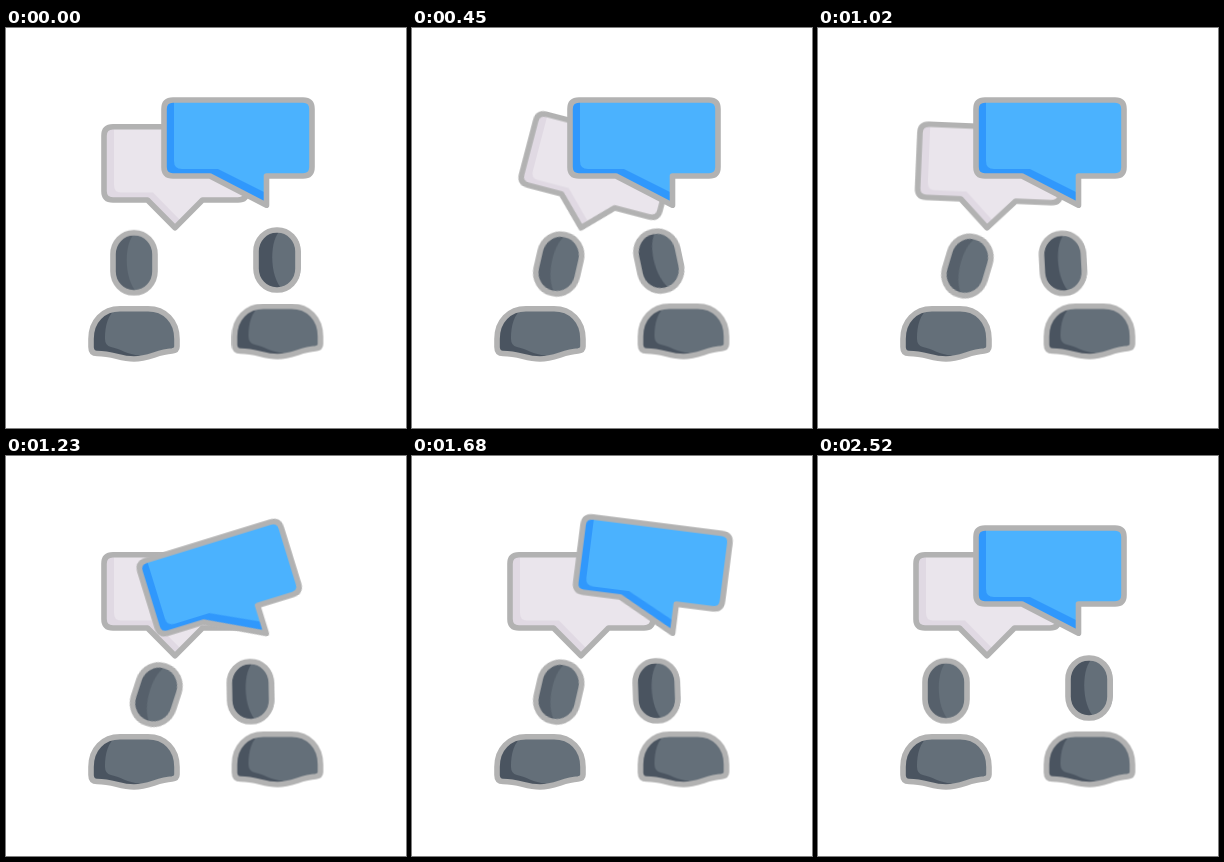
Recreate the animation shown at these times as an HTML page. Size 400 by 400 pixels, loop 2550 ms.

```html
<!DOCTYPE html>
<html lang="en">
<head>
<meta charset="utf-8">
<title>Conversation</title>
<style>
html, body { margin: 0; width: 100%; height: 100%; overflow: hidden; background: #fff; }
svg { display: block; width: 100%; height: 100%; }

.line { fill: none; stroke: #b2b2b2; stroke-width: 5.6; stroke-linejoin: round; }
.skin { fill: #646f79; }
.dark { fill: #4a5460; }
.soft { fill: #56606b; }

.move { animation: 2550ms infinite cubic-bezier(.37, 0, .63, 1); }
.bubble-l { transform-origin: 169px 200px; animation-name: bubble-l; }
.bubble-r { transform-origin: 261px 178px; animation-name: bubble-r; }
.head-l { animation-name: head-l; }
.head-r { animation-name: head-r; }
.body-l { animation-name: body-l; }
.body-r { animation-name: body-r; }

/* Each bubble swings on its tail tip and settles */
@keyframes bubble-l {
  0%, 45.88%, 100% { transform: rotate(0deg); }
  6.47% { transform: rotate(-20.5deg); }
  18.43% { transform: rotate(15deg); }
  28.63% { transform: rotate(-8.8deg); }
  37.65% { transform: rotate(3deg); }
}
@keyframes bubble-r {
  0%, 43.53%, 89.41%, 100% { transform: rotate(0deg); }
  50% { transform: rotate(-20.5deg); }
  61.96% { transform: rotate(14.5deg); }
  72.5% { transform: rotate(-9deg); }
  81.18% { transform: rotate(3deg); }
}
@keyframes head-l {
  0%, 90.6%, 100% { transform: translate(0, 0) rotate(0deg); }
  15.7%, 17.65% { transform: translate(18.7px, 1.2px) rotate(13deg); animation-timing-function: linear; }
  29.41% { transform: translate(20.3px, 2.3px) rotate(15deg); animation-timing-function: linear; }
  48.24% { transform: translate(22.2px, 3.8px) rotate(18deg); }
  52.94% { transform: translate(23px, 4.8px) rotate(19.5deg); }
  65.88%, 80% { transform: translate(18.7px, 1.2px) rotate(13deg); }
}
@keyframes head-r {
  0%, 83.5%, 100% { transform: translate(0, 0) rotate(0deg); }
  15.7%, 17.65% { transform: translate(-24.2px, 1px) rotate(-12deg); }
  29.41%, 31.37% { transform: translate(-24.2px, 2px) rotate(-12deg); }
  43.53%, 48.24% { transform: translate(-26.5px, 3.6px) rotate(-1deg); }
  65.88%, 72.94% { transform: translate(-26.5px, 2.8px) rotate(-2deg); }
  78.82% { transform: translate(-7.5px, 3.4px) rotate(1deg); }
}
@keyframes body-l {
  0%, 13.7%, 80%, 91.8%, 100% { transform: scale(1, 1); }
  5.9%, 85.5% { transform: scale(1.045, .96); }
}
@keyframes body-r {
  0%, 13.7%, 72.94%, 84.7%, 100% { transform: scale(1, 1); }
  5.9%, 78.82% { transform: scale(1.045, .965); }
}
</style>
</head>
<body>
<svg viewBox="0 0 400 400">
  <defs>
    <path id="talk-l" d="M107 98.700H232Q241 98.700 241 107.700V163Q241 172 232 172H196.500L169 199.800L141.500 172H107Q98 172 98 163V107.700Q98 98.700 107 98.700Z"/>
    <path id="talk-r" d="M167 72H297Q306 72 306 81V139Q306 148 297 148H260.500V177.200L204 148H167Q158 148 158 139V81Q158 72 167 72Z"/>
    <rect id="head" x="-21" y="-30" width="42" height="60" rx="20.500" ry="21.500"/>
    <!-- Origin is the middle of the base -->
    <path id="body" d="M-43 -15V-23C-43 -41 -31 -53.200 -14 -53.200H14C31 -53.200 43 -41 43 -23V-15.500Q43 -11.500 38 -11C23 -10 15 -3 0 -3C-15 -3 -20 -8.500 -37 -8.500Q-43 -8.500 -43 -15Z"/>
    <clipPath id="in-talk-l"><use href="#talk-l"/></clipPath>
    <clipPath id="in-talk-r"><use href="#talk-r"/></clipPath>
    <clipPath id="in-head"><use href="#head"/></clipPath>
    <clipPath id="in-body"><use href="#body"/></clipPath>
    <path id="head-light" clip-path="url(#in-head)" d="M3 -31C-11 -24 -11 20 5 31H24V-31Z"/>
    <g id="torso">
      <use href="#body" class="dark"/>
      <path class="skin" clip-path="url(#in-body)" d="M-14 -55C-26 -50 -29 -37 -29 -23Q-29 -16.500 -23 -15C-13 -13 -7 -7.500 6 -6.500L14 0H46V-55Z"/>
      <use href="#body" class="line"/>
    </g>
  </defs>

  <g class="move bubble-l">
    <use href="#talk-l" fill="#e0d9e3"/>
    <path clip-path="url(#in-talk-l)" fill="#eae5ec" d="M108 96V157Q108 164.500 115 164.500H147L176 194L244 175V96Z"/>
    <use href="#talk-l" class="line"/>
  </g>
  <g class="move bubble-r">
    <use href="#talk-r" fill="#3098fc"/>
    <path clip-path="url(#in-talk-r)" fill="#4bb2fe" d="M168 69V133Q168 141 176 141H212L262 166V151H309V69Z"/>
    <use href="#talk-r" class="line"/>
  </g>

  <g transform="translate(128 334)"><g class="move body-l"><use href="#torso"/></g></g>
  <g transform="translate(271.500 331.500)"><g class="move body-r"><use href="#torso"/></g></g>

  <g transform="translate(128 234.800)">
    <g class="move head-l">
      <use href="#head" class="soft"/>
      <use href="#head-light" class="skin"/>
      <use href="#head" class="line"/>
    </g>
  </g>
  <g transform="translate(271 232)">
    <g class="move head-r">
      <use href="#head" class="dark"/>
      <use href="#head-light" x="2.500" class="skin"/>
      <use href="#head" class="line"/>
    </g>
  </g>
</svg>
</body>
</html>
```
